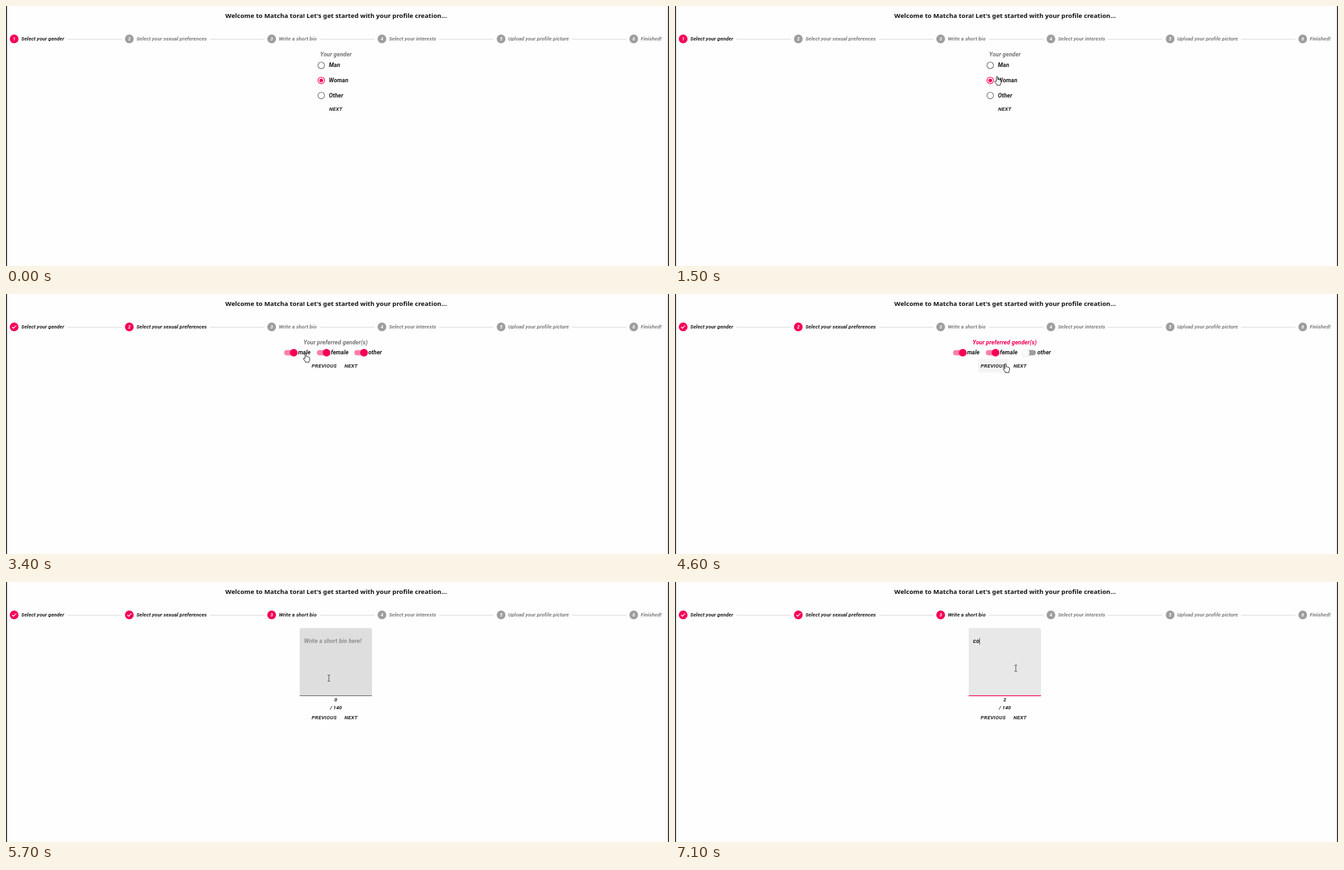
An HTML page for the animation above (7.2 s loop, 1000 by 392 pixels).

```html
<!DOCTYPE html>
<html lang="en">
<head>
<meta charset="utf-8">
<title>Profile creation</title>
<style>
html, body { margin: 0; width: 100%; height: 100%; overflow: hidden; background: #fefefe; }
svg { display: block; width: 100vw; height: 100vh; }
text { font: italic 700 8.8px Roboto, sans-serif; letter-spacing: .0094em; fill: #1c1c1c; white-space: pre; }
.title { font: 700 9.61px "Noto Sans", "Open Sans", sans-serif; letter-spacing: 0; fill: #111; }
.step { font-size: 7.73px; letter-spacing: .0107em; }
.num { font-size: 6.5px; fill: #fff; text-anchor: middle; letter-spacing: 0; }
.button { font-size: 7.8px; letter-spacing: .0286em; fill: #262626; }
.count { font-size: 7.7px; text-anchor: middle; }
.grey { fill: #757575; }
.hint { fill: #8f8f8f; }
</style>
</head>
<body>
<svg id="stage" viewBox="0 0 1000 392"></svg>
<script>
const LOOP = 7200, TICK = 100;
const PINK = '#f50057', GREY = '#9e9e9e';
const PAGE_TWO = 2200, PAGE_THREE = 5000;
const TOGGLE_OFF = 4000, FOCUS = 6300;
const stage = document.getElementById('stage');

function el(parent, tag, attrs = {}, content = '') {
  const node = document.createElementNS('http://www.w3.org/2000/svg', tag);
  set(node, attrs);
  node.textContent = content;
  return parent.appendChild(node);
}
function set(node, attrs) {
  for (const key in attrs) node.setAttribute(key, attrs[key]);
}
const label = (parent, x, y, content, cls = '') => el(parent, 'text', { x, y, class: cls }, content);
const rect = (parent, x, y, width, height, fill, rx = 0) =>
  el(parent, 'rect', { x, y, width, height, fill, rx });
const circle = (parent, cx, cy, r, fill) => el(parent, 'circle', { cx, cy, r, fill });
const show = (node, on) => node.setAttribute('visibility', on ? 'inherit' : 'hidden');
const clamp = v => Math.max(0, Math.min(1, v));

rect(stage, 0, 0, 1000, 392, '#fefefe');
rect(stage, 0, 0, 1.4, 392, '#111');
rect(stage, 998.6, 0, 1.4, 392, '#111');
label(stage, 330.8, 17.8, "Welcome to Matcha tora! Let's get started with your profile creation...", 'title');

// Stepper: icon centre, label, connector start
const steps = [
  [12.3, 'Select your gender', 92.5],
  [186, 'Select your sexual preferences', 308],
  [400.7, 'Write a short bio', 473.5],
  [567, 'Select your interests', 653],
  [746.8, 'Upload your profile picture', 854],
  [946.8, 'Finished!', 0]
].map(([x, name, lineX], i) => {
  const disc = circle(stage, x, 49.7, 6.6, GREY);
  const num = label(stage, x, 52, i + 1, 'num');
  const check = el(stage, 'path', {
    d: 'M-3.2 .2L-1.1 2.2 3.2-2.1', transform: `translate(${x} 49.5)`,
    fill: 'none', stroke: '#fff', 'stroke-width': 1.1
  });
  const text = label(stage, x + 10.7, 52.3, name, 'step');
  if (lineX) rect(stage, lineX, 49.8, 82.3, .6, '#bdbdbd');
  return { disc, num, check, text };
});

const pages = [0, 1, 2].map(() => el(stage, 'g'));

function button(page, x, y, name, boxX, boxWidth) {
  const hover = rect(page, boxX, y - 12.6, boxWidth, 20.6, '#f4f4f4', 2.4);
  label(page, x, y, name, 'button');
  return hover;
}
const navButtons = (page, y) => [
  button(page, 461, y, 'PREVIOUS', 457, 46),
  button(page, 510.5, y, 'NEXT', 503, 36.5)
];

// Gender
label(pages[0], 473.8, 76.4, 'Your gender', 'grey');
['Man', 'Woman', 'Other'].forEach((name, i) => {
  const y = 89.5 + i * 22.7, on = i === 1;
  const ring = circle(pages[0], 475.5, y, 4.95, 'none');
  set(ring, { stroke: on ? PINK : '#757575', 'stroke-width': 1.1 });
  if (on) circle(pages[0], 475.5, y, 2.8, PINK);
  label(pages[0], 487, y + 2.9, name);
});
const firstNext = button(pages[0], 487.5, 158.3, 'NEXT', 478.5, 38);

// Preferences
const preferTitle = label(pages[1], 448.8, 76.4, 'Your preferred gender(s)');
const switches = [[434, 'male'], [483.5, 'female'], [540, 'other']].map(([x, name]) => {
  const track = rect(pages[1], x - 14.6, 84.4, 18.8, 8.2, PINK, 4.1);
  const shadow = circle(pages[1], x, 89, 6.1, 'rgba(0,0,0,.1)');
  const thumb = circle(pages[1], x, 88.5, 5.8, PINK);
  label(pages[1], x + 6.4, 91.4, name);
  return { x, track, shadow, thumb };
});
const [prevHover, nextHover] = navButtons(pages[1], 110.5);

// Bio
const field = el(pages[2], 'path', { d: 'M443 172V71.9a2.4 2.4 0 0 1 2.4-2.4H549.6a2.4 2.4 0 0 1 2.4 2.4V172Z' });
const underline = rect(pages[2], 443, 171.3, 109, .7, '#333');
const focusLine = rect(pages[2], 443, 170.9, 109, 1.2, PINK);
const hint = label(pages[2], 449.6, 92.4, 'Write a short bio here!', 'hint');
const typed = label(pages[2], 449.6, 92.4, '');
const caret = rect(pages[2], 459, 84.5, .7, 9.8, '#222');
const counter = label(pages[2], 497.5, 180.3, '0', 'count');
label(pages[2], 497.7, 191.7, '/ 140', 'count');
navButtons(pages[2], 206.7).forEach(hover => show(hover, false));

// Pointers, hotspot at 0,0
const pointer = (d, attrs) => el(stage, 'path', {
  d, fill: '#fff', stroke: '#222', 'stroke-width': .9, 'stroke-linejoin': 'round', ...attrs
});
const pointers = {
  arrow: pointer('M.4 0V9.2L2.4 7.4 3.8 10.6 5.2 10 3.9 6.9H6.4Z'),
  hand: pointer('M-1 8V1Q-1 0 0 0 1 0 1 1V5Q2 4.2 2.7 5.2 3.7 4.6 4.4 5.6 6 5.2 6 6.8V9.5Q6 11 5 12V13.4H-.5V12.3L-3.3 8.6Q-3.8 7-2.2 7.2Z'),
  beam: pointer('M-2-4.6H-.6L0-4.2 .6-4.6H2M0-4.2V4.2M-2 4.6H-.6L0 4.2 .6 4.6H2', { fill: 'none', stroke: '#444' })
};
const path = [
  [100, 782, 290], [400, 718, 213], [800, 646, 142], [1100, 560, 117],
  [1400, 486, 106], [1600, 485.5, 106], [2000, 495, 150], [2200, 495, 152],
  [2400, 491, 153], [2700, 491, 153], [3000, 474, 126], [3400, 452, 89.5],
  [3800, 541, 89.5], [4000, 541, 89.5], [4300, 524, 100], [4600, 498.5, 105],
  [4900, 519, 106], [5100, 519, 107], [5400, 496, 139], [5700, 487, 145],
  [6000, 494, 141], [6600, 514, 130]
];
function pointerAt(t) {
  const i = path.findIndex(p => p[0] > t);
  if (i < 0) return path[path.length - 1].slice(1);
  const [t0, x0, y0] = path[i - 1], [t1, x1, y1] = path[i];
  const k = (t - t0) / (t1 - t0);
  return [x0 + (x1 - x0) * k, y0 + (y1 - y0) * k];
}
function pointerKind(t) {
  if (t >= PAGE_THREE) return 'beam';
  return (t >= 1400 && t < PAGE_TWO) || t >= 3300 ? 'hand' : 'arrow';
}

function render(t) {
  const current = t < PAGE_TWO ? 0 : t < PAGE_THREE ? 1 : 2;
  pages.forEach((page, i) => show(page, i === current));
  steps.forEach(({ disc, num, check, text }, i) => {
    set(disc, { fill: i <= current ? PINK : GREY });
    show(num, i >= current);
    show(check, i < current);
    text.style.fill = i <= current ? '#1c1c1c' : '#7c7c7c';
  });

  show(firstNext, current === 0 && t >= 2000);
  show(prevHover, current === 1 && t >= 4400 && t < 4700);
  show(nextHover, current === 1 && t >= 4700);

  preferTitle.style.fill = t >= TOGGLE_OFF ? PINK : '#757575';
  switches.forEach(({ x, track, shadow, thumb }, i) => {
    const off = i === 2 ? clamp((t - TOGGLE_OFF + 100) / 200) : 0;
    set(track, { fill: off ? GREY : '#fa80ab' });
    set(thumb, { cx: x - 11 * off, fill: off ? '#fafafa' : PINK });
    set(shadow, { cx: x - 11 * off });
    show(shadow, off > 0);
  });

  const focused = t >= FOCUS;
  const value = t >= 7100 ? 'co' : t >= 6800 ? 'c' : '';
  const grow = focused ? clamp((t - FOCUS + 100) / 200) : 0;
  set(field, { fill: focused ? '#e8e8e8' : '#dedede' });
  show(underline, grow < 1);
  set(focusLine, { x: 497.5 - 54.5 * grow, width: 109 * grow });
  show(hint, !value);
  typed.textContent = value;
  counter.textContent = value.length;
  show(caret, focused);
  set(caret, { x: 449.4 + value.length * 4.8 });

  const kind = pointerKind(t);
  for (const name in pointers) show(pointers[name], t >= 100 && name === kind);
  if (t >= 100) {
    const [x, y] = pointerAt(t);
    set(pointers[kind], { transform: `translate(${x} ${y})` });
  }
}

const start = performance.now();
function frame() {
  const t = (performance.now() - start) % LOOP;
  render(Math.floor(t / TICK) * TICK);
  requestAnimationFrame(frame);
}
render(0);
frame();
</script>
</body>
</html>
```
